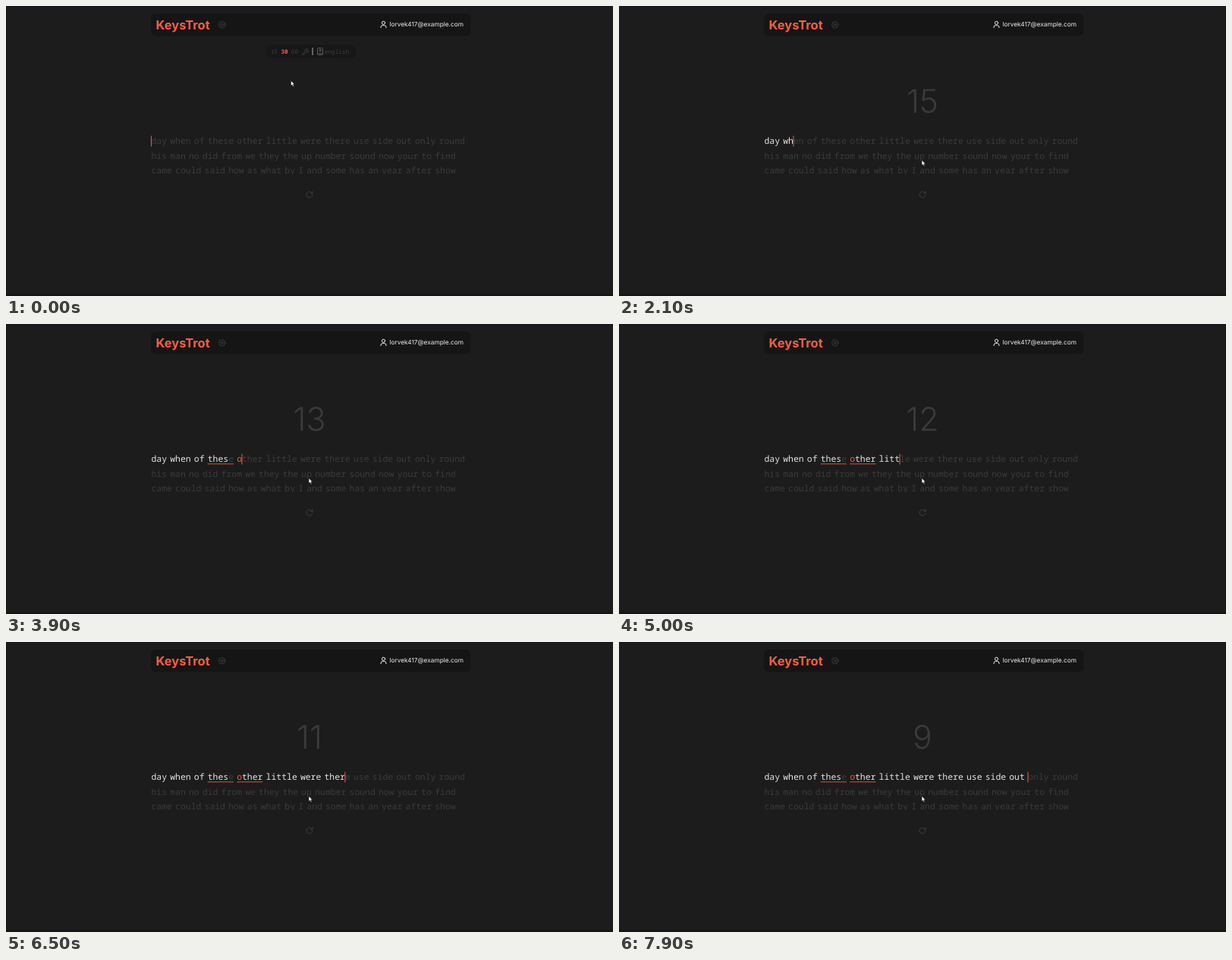
Recreate the animation shown at these times as an HTML page. Size 800x383 px, loop 8000 ms.

```html
<!DOCTYPE html>
<html lang="en">
<head>
<meta charset="utf-8">
<title>Typing trainer</title>
<style>
  html, body { margin: 0; width: 100%; height: 100%; overflow: hidden; background: #1c1c1c; }
  svg { display: block; width: 100vw; height: 100vh; }
  text { font-family: Inter, "Open Sans", sans-serif; text-rendering: geometricPrecision; white-space: pre; }
  .mono, .mono text { font-family: "Noto Sans Mono", "DejaVu Sans Mono", monospace; }
  .icon { fill: none; stroke: #414141; stroke-width: .9; stroke-linecap: round; stroke-linejoin: round; }
  #words text { font-size: 11.43px; fill: #3b3b3b; }
  #pill text { font-size: 7.7px; fill: #3d3d3d; }
  #pill .on { fill: #f4593c; font-weight: 700; }
  .ok { fill: #e4e4e4; }
  .bad { fill: #f4593c; }
</style>
</head>
<body>
<svg viewBox="0 0 800 383" preserveAspectRatio="none">
  <defs>
    <clipPath id="rows"><rect x="185" y="165" width="430" height="57.2"/></clipPath>
  </defs>
  <rect width="800" height="383" fill="#1c1c1c"/>
  <rect width="800" height="1.5" fill="#17171f"/>
  <rect y="380.5" width="800" height="2.5" fill="#1a1215"/>

  <rect x="191" y="10" width="421.5" height="29.5" rx="6" fill="#151515"/>
  <text x="197.5" y="31" font-size="16.5" font-weight="700" fill="#f95e40">KeysTrot</text>
  <g class="icon" transform="translate(284.7 24.8)">
    <circle r="1.4"/>
    <path id="gear"/>
  </g>
  <g class="icon" style="stroke:#ececec;stroke-width:1">
    <circle cx="497.5" cy="22.3" r="2.1"/>
    <path d="M494 28.6V28a2.4 2.4 0 0 1 2.4-2.4h2.2A2.4 2.4 0 0 1 501 28v.6"/>
  </g>
  <text x="603" y="27.4" font-size="8.3" text-anchor="end" fill="#ececec">lorvek417@example.com</text>

  <g id="pill" class="mono">
    <rect x="342.5" y="51" width="118.5" height="18" rx="7" fill="#171717"/>
    <text class="mode" x="349" y="62.8">15</text>
    <text class="mode" x="362.4" y="62.8">30</text>
    <text class="mode" x="375.8" y="62.8">60</text>
    <path class="icon" d="M390.5 63.8l3.6-3.6a2.6 2.6 0 0 1 3-3.6l-1.5 1.6.4 1.2 1.2.3 1.5-1.5a2.6 2.6 0 0 1-3.5 3l-3.5 3.4z"/>
    <rect x="403.4" y="55" width="1.3" height="10" fill="#8b8b8b"/>
    <g class="icon" style="stroke:#626262">
      <rect x="410.5" y="55.5" width="7" height="9" rx="1"/>
      <path d="M410.5 62.8h7"/>
      <circle cx="414" cy="58.5" r="1.3"/>
    </g>
    <text x="419.8" y="62.8">english</text>
  </g>

  <text id="timer" x="400" y="141" font-size="43" font-weight="300" text-anchor="middle" fill="#3a3a3a"></text>
  <g id="words" class="mono" clip-path="url(#rows)"></g>
  <g id="lines" fill="#d9523a"></g>
  <rect id="caret" y="171.5" width="1.1" height="14" fill="#e4553b"/>
  <path class="icon" d="M403.4 247a4 4 0 1 0 .6 2.6M404.2 245v2.4h-2.4"/>
  <path id="pointer" d="M0 0v7l1.6-1.4 1.2 2.5 1.2-.6-1.1-2.4H5z" fill="#fff" stroke="#0c0c0c" stroke-width=".6"/>
</svg>
<script>
const LOOP = 8000, TICK = 100;
const LEFT = 191.5, ADVANCE = 6.86, GAP = 4.15;
const MISSED = 16, WRONG = 18;
const ROWS = [
  "day when of these other little were there use side out only round",
  "his man no did from we they the up number sound now your to find",
  "came could said how as what by I and some has an year after show"
];
// time, caret index in the first row
const TYPING = [
  [1500, 0], [2100, 6], [2300, 8], [2400, 9], [2600, 10], [2700, 11], [2900, 12],
  [3100, 14], [3200, 16], [3499, 16], [3500, 18], [3600, 19], [4199, 19],
  [4200, 20], [4400, 22], [4599, 22], [4600, 23], [4700, 24], [5400, 35],
  [5500, 36], [6199, 36], [6200, 37], [7200, 47], [7900, 55]
];
// time, x, y
const POINTER = [
  [0, 375.5, 98.5], [200, 355, 62], [500, 353, 60], [700, 373, 120], [900, 399, 203.5]
];

const $ = id => document.getElementById(id);
const add = (parent, tag, attrs) => {
  const el = document.createElementNS("http://www.w3.org/2000/svg", tag);
  for (const name in attrs) el.setAttribute(name, attrs[name]);
  return parent.appendChild(el);
};
const clamp = v => Math.max(0, Math.min(1, v));

function sample(keys, t, col = 1) {
  let i = 0;
  while (i < keys.length - 2 && t >= keys[i + 1][0]) i++;
  const [a, b] = [keys[i], keys[i + 1]];
  return a[col] + (b[col] - a[col]) * clamp((t - a[0]) / (b[0] - a[0]));
}

function charX(row, index) {
  let x = LEFT;
  for (let i = 0; i < index; i++) x += row[i] === " " ? GAP : ADVANCE;
  return x;
}

const letters = [];
ROWS.forEach((row, r) => {
  let start = 0;
  for (const word of row.split(" ")) {
    const text = add($("words"), "text", { x: charX(row, start), y: 182.3 + r * 19.5 });
    [...word].forEach((ch, i) => {
      const span = add(text, "tspan", {});
      span.textContent = ch;
      if (r === 0) letters[start + i] = span;
    });
    start += word.length + 1;
  }
});

// words finished with a mistake get a rule below
const marks = [[12, 18], [18, 24]].map(([from, next]) => ({
  next,
  el: add($("lines"), "rect", { x: charX(ROWS[0], from), y: 184.3, width: 5 * ADVANCE, height: 1 })
}));

let outline = "";
for (let i = 0; i < 32; i++) {
  const angle = (i + .5) * Math.PI / 16, radius = i % 4 < 2 ? 4.5 : 3.5;
  outline += `${i ? "L" : "M"}${radius * Math.cos(angle)} ${radius * Math.sin(angle)}`;
}
$("gear").setAttribute("d", outline + "z");

const modes = document.querySelectorAll(".mode");

function draw(t) {
  const caret = Math.floor(sample(TYPING, t) + 1e-6);
  letters.forEach((el, i) => {
    const done = i < caret && i !== MISSED;
    el.setAttribute("class", done ? (i === WRONG ? "bad" : "ok") : "");
  });
  marks.forEach(m => m.el.setAttribute("opacity", caret >= m.next ? 1 : 0));
  $("caret").setAttribute("x", charX(ROWS[0], caret) - .6);

  const active = t < 400 ? 1 : 0;
  modes.forEach((el, i) => el.classList.toggle("on", i === active));
  $("pill").setAttribute("opacity", clamp((1800 - t) / 300));

  $("timer").textContent = 15 - Math.max(0, Math.floor((t - 1600) / 1000));
  $("timer").setAttribute("opacity", clamp((t - 1500) / 300));
  $("pointer").setAttribute("transform",
    `translate(${sample(POINTER, t, 1)} ${sample(POINTER, t, 2)})`);
}

const origin = performance.now();
function loop() {
  const t = (performance.now() - origin) % LOOP;
  draw(Math.floor(t / TICK) * TICK);
  requestAnimationFrame(loop);
}
loop();
</script>
</body>
</html>
```
